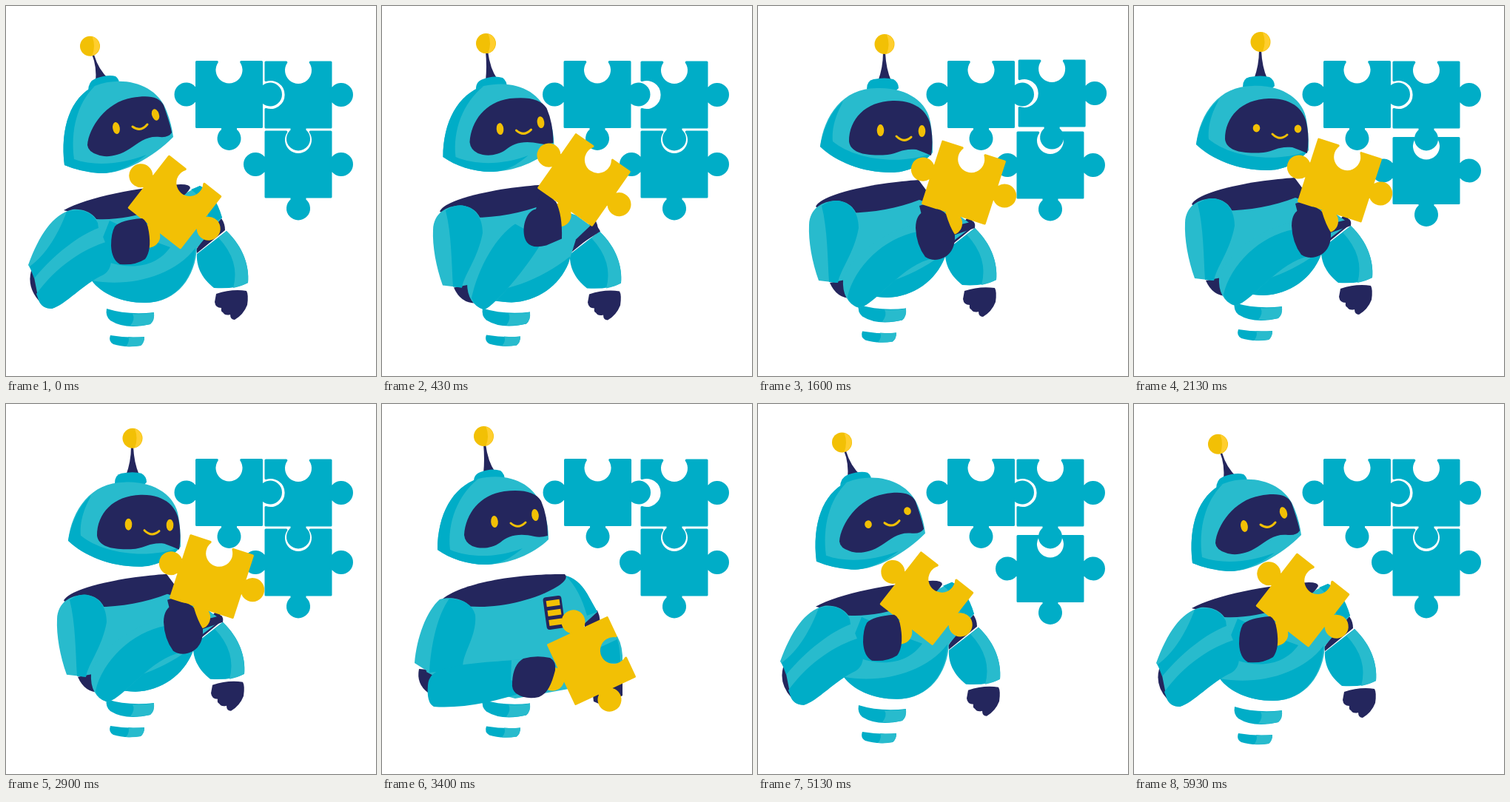
Write an HTML page that moves like this. It is 500 by 500 pixels and loops after 6010 ms.

```html
<!DOCTYPE html>
<html lang="en">
<head>
<meta charset="utf-8">
<title>Robot with puzzle</title>
<style>
  html, body { margin: 0; width: 100%; height: 100%; overflow: hidden; background: #fff; }
  svg { display: block; width: 100%; height: 100%; }
  .l { fill: #28bbcd; }
  .d { fill: #00adc7; }
  .n { fill: #24265d; }
  .g { fill: #f2c005; }
  .y { fill: #ffce2e; }
  .piece { stroke-width: 3; stroke-linejoin: round; }
  .piece.d { stroke: #00adc7; }
  .piece.g { stroke: #f2c005; }
  .smile { fill: none; stroke: #f2c005; stroke-width: 3; stroke-linecap: round; }
</style>
</head>
<body>
<svg id="stage" viewBox="0 0 500 500"></svg>
<script>
const LOOP = 6010;

const path = (cls, d) => `<path class="${cls}" d="${d}"/>`;

// Each side: knob centre distance, radius, half neck width, 1 = tab / 0 = socket
const HALF = 44;
const TAB = [58, 14.5, 9, 1];
const SHORT_TAB = [55.5, 14.5, 8, 1];
const LONG_TAB = [59.5, 14.5, 9, 1];
const SOCKET = [33, 19.5, 16.2, 0];
const WIDE_SOCKET = [37.4, 20.5, 19.4, 0];

function outline(sides) {
  let d = '';
  sides.forEach(([c, r, w, out], turn) => {
    const at = (x, y) => {
      for (let i = 0; i < turn; i++) [x, y] = [-y, x];
      return x.toFixed(2) + ' ' + y.toFixed(2);
    };
    const h = Math.sqrt(r * r - w * w);
    const y = out ? h - c : -c - h;
    d += `${turn ? 'L' : 'M'}${at(-HALF, -HALF)}L${at(-w, -HALF)}L${at(-w, y)}` +
         `A${r} ${r} 0 1 ${out} ${at(w, y)}L${at(w, -HALF)}`;
  });
  return d + 'Z';
}

const piece = (cls, x, y, angle, sides) =>
  `<path class="piece ${cls}" transform="translate(${x} ${y}) rotate(${angle})" d="${outline(sides)}"/>`;
const gold = (x, y, angle) => piece('g', x, y, angle, [SOCKET, TAB, TAB, TAB]);

const eye = (x, y, angle) =>
  `<ellipse class="g eye" cx="${x}" cy="${y}" rx="4.8" ry="8" transform="rotate(${angle} ${x} ${y})"/>`;
const ball = (x, y) =>
  `<circle class="g" cx="${x}" cy="${y}" r="13.5"/>` +
  path('y', `M${x + 3} ${y - 13}A13.5 13.5 0 0 1 ${x + 3} ${y + 13}Q${x + 8} ${y} ${x + 3} ${y - 13}Z`);

// Head facing forward, used by two poses with a small shift
const frontHead = (dx, dy, antennaShift) => `<g transform="translate(${dx} ${dy})">
  <g transform="translate(${antennaShift} 0)">
  ${path('n', 'M137 54L140 54Q143 78 153 92L137 94Q139 75 137 54Z')}
  ${path('d', 'M124 108Q123 95 133 92Q148 86 160 90Q166 94 166 104L160 112L128 114Z')}
  ${ball(137.5, 43.5)}</g>
  ${path('l', 'M75 197C75 150 95 112 130 101C170 92 205 106 217 140Q225 160 225 183C205 203 170 217 140 217C115 217 92 209 75 197Z')}
  ${path('d', 'M75 197C75 150 95 112 130 101C102 124 88 160 92 197C120 209 160 207 190 195C170 212 155 217 140 217C115 217 92 209 75 197Z')}
  ${path('n', 'M111 177C113 148 132 123 165 118C190 115 208 119 215 131Q224 152 224 178Q214 181 206 179C185 174 170 178 160 187C148 196 132 196 122 192Q112 187 111 177Z')}
  ${eye(152, 159, -5)}${eye(207, 150, -8)}
  <path class="smile" d="M174 161Q184 170 194 160"/></g>`;

const leanHead = `
  ${path('n', 'M116 65L119 66Q125 86 139 99L121 103Q123 82 116 65Z')}
  ${path('d', 'M111 115Q111 102 121 98Q138 92 148 95Q154 99 153 108L150 114L115 118Z')}
  ${ball(113.5, 54.2)}
  ${path('l', 'M79 215C73 165 87 123 120 108C155 94 203 103 217 142Q224 160 226 177C198 205 160 226 130 226Q100 224 79 215Z')}
  ${path('d', 'M79 215C73 165 87 123 120 108C96 132 87 168 92 207C120 217 155 214 190 201C165 220 142 227 126 226Q100 224 79 215Z')}
  ${path('n', 'M110 188C112 164 135 130 170 124C192 120 207 122 213 134Q222 160 224 171Q220 178 208 177C190 175 181 184 167 193C150 204 134 205 124 201Q111 197 110 188Z')}
  ${eye(149, 165, -10)}${eye(202, 147, -18)}
  <path class="smile" d="M171 163Q182 171 191 160"/>`;

const turnedHead = `
  ${path('n', 'M169 60H172Q173 82 180 98L162 99Q169 80 169 60Z')}
  ${path('d', 'M147 109Q147 98 156 96Q172 93 183 96Q190 100 190 108L184 114H152Z')}
  ${ball(171, 48.5)}
  ${path('l', 'M84 187C89 145 115 108 160 108C200 106 229 126 233 154Q236 170 236 195C220 214 200 222 180 222C140 222 105 207 84 187Z')}
  ${path('d', 'M84 187C89 160 100 138 115 126C102 150 100 166 101 180C130 204 190 213 235 196C220 214 200 222 180 222C140 222 105 207 84 187Z')}
  ${path('n', 'M123 180C123 150 145 126 182 125C215 124 232 142 234 163Q237 180 234 199Q225 195 214 191C195 189 190 196 175 198C150 200 125 197 123 180Z')}
  ${eye(165.5, 165, 0)}${eye(221.5, 166, 0)}
  <path class="smile" d="M187 173Q197 183 207 174"/>`;

const rightArm = (dx, dy) => `<g transform="translate(${dx} ${dy})">
  ${path('n', 'M257 329L268 312L291 287Q296 294 296 303L258 334Z')}
  ${path('d', 'M258 335L298 304C321 326 329 352 327 374Q310 383 281 381C263 367 257 350 258 335Z')}
  ${path('l', 'M287 313L298 304C321 326 329 352 327 374Q318 379 307 381Q317 345 287 313Z')}
  ${path('n', 'M284 389Q305 382 325 385Q328 390 326 404Q321 417 309 424Q303 424 303 417Q296 419 293 414Q290 413 291 408Q283 408 282 400Z')}</g>`;

const sideTorso = `
  ${path('n', 'M78 275Q82 266 110 257C150 245 190 241 217 239L240 270L140 310L85 280Z')}
  ${path('l', 'M80 279C120 288 175 283 218 266L262 280L291 301L258 326L252 345C240 375 210 397 175 398C145 397 125 385 106 377L90 300Z')}
  ${path('d', 'M118 385C160 386 212 370 254 336L252 345C240 375 210 397 175 398Q140 397 118 385Z')}
  ${path('n', 'M97 378L118 374L130 399Q107 401 97 378Z')}
  ${path('l', 'M69 300C70 277 87 268 105 267C128 268 136 284 136 302C132 335 110 365 108 378L82 375C73 350 68 322 69 300Z')}
  ${path('d', 'M86 274Q97 266 109 267C131 271 136 290 136 304C130 338 110 362 108 378L96 377C94 345 94 305 86 274Z')}`;

const poses = [
  { from: 30, ref: 1000, art: `
    ${rightArm(-4, -2)}${sideTorso}
    ${path('n', 'M258 326L262 313L284 292Q292 295 295 302Z')}
    ${path('l', 'M115 372C123 340 155 300 190 289L214 320C196 350 155 400 138 408Q115 400 115 372Z')}
    ${path('d', 'M121 392C130 350 155 308 180 292L198 302L214 320C196 350 155 400 138 408Q125 404 121 392Z')}
    ${frontHead(7.5, 4.7, -4.5)}
    ${gold(273, 232.5, 35)}
    ${path('n', 'M208 272C192 275 187 305 196 317Q203 326 222 321L243 312Q244 280 235 262Q222 252 214 250Z')}` },
  { from: 1530, ref: 2130, art: `
    ${rightArm(-5, -7)}
    <g transform="translate(0 -7)">${sideTorso}</g>
    ${path('n', 'M264 307L275 292L291 288Q294 291 293 297Z')}
    ${path('l', 'M115 366C123 338 168 300 216 292L236 338C195 345 162 398 137 405Q113 397 115 366Z')}
    ${path('d', 'M121 390C130 350 170 310 216 302L238 338C195 345 162 398 137 405Q123 401 121 390Z')}
    ${turnedHead}
    ${path('n', 'M218 267L240 260L240 290L222 283Z')}
    ${gold(278, 235.5, 18)}
    ${path('n', 'M213 297Q213 278 227 273Q244 267 254 278Q259 295 266 306Q267 327 253 336Q238 344 226 336Q214 320 213 297Z')}` },
  { from: 3030, ref: 3400, art: `
    ${path('n', 'M272 285L291 279Q297 292 293 305L325 370V394L300 408L286 402Z')}
    ${path('n', 'M50 358Q46 378 62 390L75 360Z')}
    ${path('l', 'M78 266L150 255L248 232Q265 236 277 256L291 281L270 300L318 314Q326 328 325 350L280 380L180 398L75 370L60 362Z')}
    ${path('d', 'M248 232Q265 236 277 256L291 281L277 286Q267 250 248 232Z')}
    ${path('d', 'M292 330L318 318Q322 330 322 350H292Z')}
    ${path('n', 'M78 267C100 243 180 229 247 230Q253 236 238 246C210 264 165 274 132 274Q100 274 78 267Z')}
    ${path('l', 'M78 264C95 259 119 264 126 285C129 315 105 342 110 358L66 364L44 350C47 315 60 280 78 264Z')}
    ${path('d', 'M91 263Q120 264 126 285C129 315 105 342 110 358L64 363C66 325 75 285 91 263Z')}
    ${path('d', 'M62 380Q63 364 82 358C115 349 150 349 198 344L196 388C155 402 108 412 70 409Q60 404 62 380Z')}
    ${path('l', 'M175 346L198 344L192 380L174 373Z')}
    <g transform="translate(232 282) rotate(-8)">
      <rect class="n" x="-12" y="-22" width="25" height="44" rx="4"/>
      <rect class="g" x="-8" y="-17" width="18" height="8"/>
      <rect class="g" x="-8" y="-4" width="18" height="8"/>
      <rect class="g" x="-8" y="9" width="18" height="8"/>
    </g>
    ${frontHead(0, 0, 0)}
    ${gold(283, 347, 65)}
    ${path('n', 'M176 376Q177 352 191 344Q208 339 227 343Q236 348 234 360C229 379 224 391 212 396Q194 400 181 391Q175 386 176 376Z')}` },
  { from: 4530, ref: 0, art: `
    ${rightArm(0, 0)}
    ${path('l', 'M115 284Q180 282 225 262L262 243Q282 252 292 286L258 327C256 365 232 401 188 401C155 401 128 388 115 370Z')}
    ${path('n', 'M78 276C110 258 180 245 236 241Q249 241 249 246Q240 262 205 274Q160 290 122 288Z')}
    ${path('d', 'M262 243Q282 252 292 286L276 296Q270 262 250 248Z')}
    ${path('d', 'M138 346C175 358 205 350 222 326L200 318L140 290L120 340Z')}
    ${path('d', 'M116 371C165 380 225 367 256 327C254 375 222 401 188 401C155 401 128 388 116 371Z')}
    ${path('n', 'M34 358Q28 380 45 399L55 365Z')}
    ${path('l', 'M30 350C45 310 62 282 90 275C115 273 127 290 128 304L142 340Q143 356 132 363C105 375 80 404 62 409Q48 409 44 397L37 362Z')}
    ${path('d', 'M32 352C55 336 72 305 82 278Q112 270 124 293L125 300C98 310 66 335 38 368Z')}
    ${path('d', 'M41 389C70 350 105 328 138 318L142 340Q143 356 132 363C105 375 80 404 62 409Q48 409 44 397Z')}
    ${leanHead}
    ${gold(228, 265, 38)}
    ${path('n', 'M147 298Q155 289 184 287Q191 290 193 305Q197 330 188 342Q174 351 154 349Q143 343 142 324Q142 307 147 298Z')}` }
];

const rings = `
  ${path('d', 'M136 409Q165 418 200 414Q201 425 195 430Q162 438 141 425Q134 419 136 409Z')}
  ${path('l', 'M171 416Q188 417 200 414Q201 425 195 430Q182 433 168 432Q175 423 171 416Z')}
  ${path('d', 'M141 445Q165 449 187 447Q187 455 182 459Q160 462 145 457Q138 453 141 445Z')}
  ${path('l', 'M165 447Q178 448 187 447Q187 455 182 459Q172 461 162 460Q168 453 165 447Z')}`;

// Puzzle pieces step out and back in a staggered cycle
const CYCLE = 3000;
const STEP_OUT = 1000;
const puzzle = [
  { x: 301.5, y: 119.5, dx: -11, dy: 0, start: 0, sides: [SOCKET, SHORT_TAB, LONG_TAB, TAB] },
  { x: 395, y: 214, dx: 0, dy: 10, start: 1500, sides: [SOCKET, TAB, LONG_TAB, TAB] },
  { x: 395, y: 120, dx: 10.5, dy: -9.5, start: 750, sides: [SOCKET, TAB, LONG_TAB, WIDE_SOCKET] }
];

const stage = document.getElementById('stage');
stage.innerHTML =
  puzzle.map(p => `<g class="part">${piece('d', p.x, p.y, 0, p.sides)}</g>`).join('') +
  `<g id="rings">${rings}</g>` +
  poses.map(p => `<g class="pose">${p.art}</g>`).join('');

const parts = [...stage.querySelectorAll('.part')];
const figures = [...stage.querySelectorAll('.pose')];
const eyes = [...stage.querySelectorAll('.eye')];
const ringGroup = document.getElementById('rings');

const move = (el, x, y) => el.setAttribute('transform', `translate(${x.toFixed(2)} ${y.toFixed(2)})`);
const wave = t => Math.cos(2 * Math.PI * t / 6000) - 1;
const swell = k => k <= 0 || k >= 1 ? 0 : Math.sin(Math.PI * k) ** 2;

function draw(now) {
  const ms = Math.min(now % LOOP, 5999);
  const t = Math.floor(ms / 100) * 100 + (ms % 100 >= 30 ? 30 : 0);
  const phase = t % CYCLE;

  puzzle.forEach((p, i) => {
    const k = swell((phase - p.start) / STEP_OUT);
    move(parts[i], p.dx * k, p.dy * k);
  });

  let active = poses.length - 1;
  poses.forEach((p, i) => { if (t >= p.from) active = i; });
  figures.forEach((el, i) => { el.style.display = i === active ? '' : 'none'; });
  move(figures[active], 0, 6 * (wave(t) - wave(poses[active].ref)));
  move(ringGroup, 0, 5 * wave(t));

  const open = 0.1 + 0.9 * Math.min(1, Math.abs(phase - 2200) / 110);
  eyes.forEach(el => el.setAttribute('ry', (8 * open).toFixed(2)));
}

const begin = performance.now();
function tick() {
  draw(performance.now() - begin);
  requestAnimationFrame(tick);
}
tick();
</script>
</body>
</html>
```
